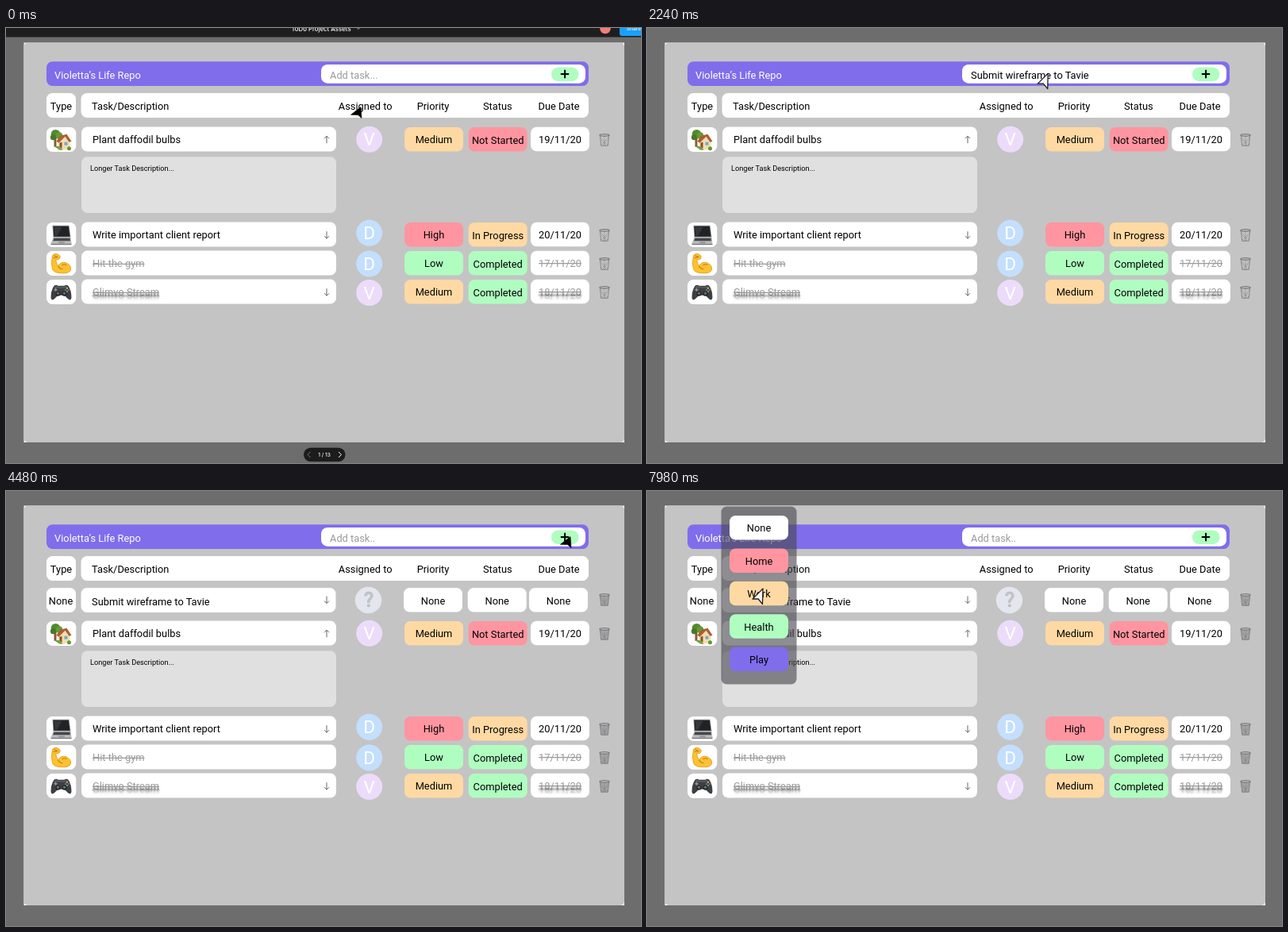
Write an HTML page that moves like this. It is 800x548 px and loops after 8 s.

```html
<!DOCTYPE html>
<html lang="en">
<head>
<meta charset="utf-8">
<title>Task board</title>
<style>
  html, body { margin: 0; width: 100%; height: 100%; overflow: hidden; background: #6d6d6d; }
  svg { display: block; width: 800px; height: 548px; }
  text { font: 12.85px Roboto, sans-serif; white-space: pre; }
  .mid { text-anchor: middle; }
  .done { fill: #9b9b9b; text-decoration: line-through; }
  .shade { text-shadow: 0 4px 2px rgba(0, 0, 0, .3); }
  .small { font-size: 9.2px; }
  .letter { font-size: 22.5px; fill: #fff; }
  .unknown { font: 500 25px Roboto, sans-serif; fill: #c3c5ca; stroke: #aeb1b8; stroke-width: .5; }
  .ui { font: 500 7.8px Inter, sans-serif; fill: #fff; }
  .tiny { font-size: 6.6px; }
  .line { fill: none; stroke: #555; stroke-width: .9; }
</style>
</head>
<body>
<svg id="stage" viewBox="0 0 800 548"></svg>
<script>
const LOOP = 8000, TYPED_AT = 1000, ADDED_AT = 3600, MENU_AT = 6550;
const C = {
  white: '#fff', purple: '#7f6dec', red: '#ff95a0', amber: '#ffd9a3', green: '#b0fdc0',
  lilac: '#ecdcfa', sky: '#c3dffd', pale: '#e3e6ec'
};

const box = (x, y, w, h, fill = C.white, r = 7.5) =>
  `<rect x="${x}" y="${y}" width="${w}" height="${h}" rx="${r}" fill="${fill}"/>`;
const text = (x, y, s, cls = '', extra = '') =>
  `<text x="${x}" y="${y + 4.6}" class="${cls}" ${extra}>${s}</text>`;
const label = (x, y, s, cls = '') => text(x, y, s, 'mid ' + cls);
const at = (x, y, body, id = '') => `<g ${id && `id="${id}"`} transform="translate(${x} ${y})">${body}</g>`;
const path = (d, fill, extra = '') => `<path d="${d}" fill="${fill}" ${extra}/>`;
const dot = (x, y, r, fill) => `<circle cx="${x}" cy="${y}" r="${r}" fill="${fill}"/>`;

const pill = (x, y, s, fill, cls = '', dy = 15.3) => box(x, y, 74, 30.5, fill) + label(x + 37, y + dy, s, cls);
const arrow = (y, up) => at(404, y, `<path class="line" d="M0-4.5V4.5M-3 ${up ? '-1.5L0-4.5L3-1.5' : '1.5L0 4.5L3 1.5'}"/>`);
const avatar = (y, s, fill) => dot(457.7, y, 16.5, fill) + text(457.7, y + 3.5, s, 'mid letter');

const bin = y => at(754, y,
  '<path class="bin" d="M-5.6-5.5L-4.3 7.3H4.3L5.6-5.5Z" stroke="#777" stroke-width=".8"/>' +
  '<path d="M-4.5-3L3.8 6M-4-.5L2 7M4.5-3L-3.8 6M4-.5L-2 7M0-5V7" stroke="#777" stroke-width=".7" stroke-dasharray="1.2 1" fill="none"/>' +
  '<ellipse cy="-6" rx="6.6" ry="1.3" fill="#bcbcbc" stroke="#686868" stroke-width=".9"/>');

const icons = {
  home: path('M-9-2H-6V9H-9Z', '#8a5a35') + dot(-7, -7, 5.8, '#548a2d') + dot(-10, -3, 3.6, '#467a28') +
    dot(-2.5, -5, 4.4, '#649a35') + path('M-4 1L4-5L11 1V11L2 13L-4 9Z', '#f3ddb0') +
    path('M-6 2L-1-5L7-7L13 2L10 3L5-4L-3 4Z', '#ad5d32') + path('M-2 4L1 3V11L-2 9Z', '#8b4c2c') +
    path('M4 3H8V7H4Z', '#6faccc') + path('M-8 9Q-3 6 2 13L-2 13Z', '#6ca33c') + dot(10, 11, 2.5, '#5f9636'),
  work: path('M-11-12H10L12 3H-10Z', '#8b8d90') + path('M-10-11H9.3L11 2H-9.2Z', '#202225') +
    path('M-9-10H1L-5 1H-8Z', '#34373b') + path('M-10 3H12L13 11H-13Z', '#b9bbbe') +
    path('M-9 4H11L11.4 7.5H-10.4Z', '#444649') + path('M-3 8.5H4L4.5 10.5H-3.5Z', '#94969a') +
    path('M-13 11H13V12.5H-13Z', '#777'),
  health: path('M-11-10Q-8-14-3-11Q0-9-2-6Q-5-4-7-5Q-6 0-4 3Q0-3 6-1Q13 2 12 8Q10 13 0 12Q-9 12-11 7Q-13 0-11-10Z', '#fcc22f',
    'stroke="#e89c1d" stroke-width=".9"') + path('M-10-7L-5-8M-9-10L-4-8M-4 3Q-2 7 2 7M1 2Q4 0 7 2', 'none', 'stroke="#c97b18" stroke-width="1.1"'),
  play: path('M-9-8Q-6-10-4-8H4Q6-10 9-8Q13-2 13 7Q12 12 8 8L4 4H-4L-8 8Q-12 12-13 7Q-13-2-9-8Z', '#3c3f43') +
    path('M-8-7Q-5-9-4-7H4Q6-9 8-7L9-5H-9Z', '#55595e') + dot(-4, 2, 3, '#222') + dot(4, 2, 3, '#222') +
    dot(-4, 1.6, 1.8, '#686b70') + dot(4, 1.6, 1.8, '#686b70') +
    path('M-9-3H-5M-7-5V-1', 'none', 'stroke="#94979b" stroke-width="1.4"') +
    dot(7.5, -4.8, 1.1, '#e3b93d') + dot(9.5, -2.7, 1.1, '#d9534a') + dot(5.5, -2.7, 1.1, '#4d86d9') + dot(7.5, -.8, 1.1, '#53b268')
};

function row(r) {
  const { y, icon, name, who, level, state, due, open, cls = '', dueY = 15.3 } = r;
  return box(51, y, 37.3, 31) + at(69.5, y + 15.7, icons[icon]) +
    box(95, y - .5, 321, 31) + text(109, y + 15.8, name, cls) +
    (open === undefined ? '' : arrow(y + 15.7, open)) +
    avatar(r.whoY, who, who === 'V' ? C.lilac : C.sky) +
    pill(502, y, ...level) + pill(582.7, y, ...state, '', 16.2) +
    pill(661, y - .3, due, C.white, cls, dueY) + bin(y + 16);
}

const rows = [
  { y: 125, icon: 'home', name: 'Plant daffodil bulbs', who: 'V', whoY: 140.3, level: ['Medium', C.amber],
    state: ['Not Started', C.red], due: '19/11/20', open: true, dueY: 16 },
  { y: 245, icon: 'work', name: 'Write important client report', who: 'D', whoY: 258.3, level: ['High', C.red],
    state: ['In Progress', C.amber], due: '20/11/20', open: false },
  { y: 281, icon: 'health', name: 'Hit the gym', who: 'D', whoY: 297, level: ['Low', C.green],
    state: ['Completed', C.green], due: '17/11/20', cls: 'done' },
  { y: 317, icon: 'play', name: 'Glimvo Stream', who: 'V', whoY: 333.5, level: ['Medium', C.amber],
    state: ['Completed', C.green], due: '18/11/20', open: false, cls: 'done shade' }
];

const header =
  box(51, 42.3, 683, 30.7, C.purple) + text(61, 59, 'Violetta’s Life Repo', '', 'fill="#fff"') +
  box(397, 46, 333, 23.7, C.white, 8) + text(408, 59, '', '', 'id="entry"') +
  box(687, 49.5, 34.5, 17.5, C.green, 8.7) + path('M698.8 58H709.2M704.1 52.8V63.2', 'none', 'stroke="#000" stroke-width="2"') +
  box(51, 82, 37, 31) + label(69.5, 98, 'Type') +
  box(94.5, 82, 639.5, 31) + text(108, 98, 'Task/Description') +
  [['Assigned to', 452.7], ['Priority', 538], ['Status', 619.3], ['Due Date', 696.5]].map(([s, x]) => label(x, 98, s)).join('');

const added = box(51, 122, 37, 31) + label(69, 138, 'None') +
  box(94.5, 122, 321, 31) + text(108, 139, 'Submit wireframe to Tavie') + arrow(137, false) +
  dot(456.5, 137.5, 16.7, C.pale) + text(457, 141.3, '?', 'mid unknown') +
  [501, 581.7, 659].map(x => pill(x, 122, 'None', C.white, '', 16)).join('') + bin(137);

const options = [['None', C.white], ['Home', C.red], ['Work', C.amber], ['Health', C.green], ['Play', C.purple]];
const menu = box(93.5, 19.5, 95, 224, 'rgba(72,72,80,.62)', 7) +
  options.map(([s, fill], i) => pill(104, 31 + i * 41.4, s, fill, '', 15.8)).join('');

const chrome = '<rect width="800" height="11.5" fill="#1e1e1e"/>' +
  '<text class="ui mid" x="397" y="4">ToDo Project Assets</text>' +
  path('M442-.5L444 1.5L446-.5', 'none', 'stroke="#bbb" stroke-width=".9"') +
  dot(755, .5, 6.8, '#f08078') + box(773, -12, 40, 22, '#18a0fb', 3) +
  '<text class="ui tiny mid" x="791" y="3">Share</text>' +
  box(375, 528.7, 52.5, 17.6, '#1c1c1c', 8.8) +
  path('M383.5 534L380 537.5L383.5 541', 'none', 'stroke="#777" stroke-width="1"') +
  path('M419 534L422.5 537.5L419 541', 'none', 'stroke="#fff" stroke-width="1"') +
  '<text class="ui tiny mid" x="401" y="540" id="page"></text>';

document.getElementById('stage').innerHTML =
  '<rect width="800" height="548" fill="#6d6d6d"/>' +
  box(22.5, 18.5, 756.5, 503.5, C.white, 0) + box(22.5, 18.5, 756.5, 503.5, '#c4c4c4', 5) +
  header + `<g id="added">${added}</g>` +
  at(0, 0, rows.map(row).join('') + box(95, 162.3, 321, 70.7, '#e0e0e0') +
    text(106, 175.2, 'Longer Task Description...', 'small'), 'list') +
  `<g id="menu">${menu}</g><g id="chrome">${chrome}</g>` +
  '<circle id="ring" cx="440.5" cy="57" fill="none" stroke="#8a8a8a" stroke-width="1"/>' +
  '<path id="cursor" stroke-linejoin="round"/>';

const $ = Object.fromEntries([...document.querySelectorAll('[id]')].map(e => [e.id, e]));
const bins = document.querySelectorAll('.bin');
const show = (el, on) => el.setAttribute('visibility', on ? 'visible' : 'hidden');
const clamp = p => Math.min(1, Math.max(0, p));
const ease = p => p < .5 ? 4 * p ** 3 : 1 - 4 * (1 - p) ** 3;

// Each move: start, end, click time, then the tip position it reaches.
const moves = [
  [250, 750, TYPED_AT, 448, 57],
  [1900, 2800, ADDED_AT, 711, 57.5],
  [4900, 6350, MENU_AT, 77, 137],
  [7450, 7960, LOOP, 146, 123]
];

function cursorAt(t) {
  let x = 447, y = 99.5, pointing = false;
  for (const [start, end, click, tx, ty] of moves) {
    const p = ease(clamp((t - start) / (end - start)));
    x += (tx - x) * p;
    y += (ty - y) * p;
    if (t >= start && t < click) pointing = true;
  }
  return { x, y, pointing };
}

function render(t) {
  const typed = t >= TYPED_AT && t < ADDED_AT, isAdded = t >= ADDED_AT;
  $.entry.textContent = typed ? 'Submit wireframe to Tavie' : isAdded ? 'Add task..' : 'Add task...';
  $.entry.setAttribute('fill', typed ? '#000' : '#9a9a9a');
  $.page.textContent = t < TYPED_AT ? '1 / 13' : '2 / 13';
  $.list.setAttribute('transform', `translate(0 ${isAdded ? 39 : 0})`);
  for (const b of bins) b.setAttribute('fill', isAdded ? '#a3a5a8' : 'none');
  show($.added, isAdded);
  show($.menu, t >= MENU_AT);
  $.chrome.setAttribute('opacity', 1 - clamp((t - 950) / 420));

  const wave = clamp((t - TYPED_AT) / 400);
  show($.ring, wave > 0 && wave < 1);
  $.ring.setAttribute('r', 6 + 14 * wave);
  $.ring.setAttribute('opacity', 1 - wave * .8);

  const { x, y, pointing } = cursorAt(t);
  $.cursor.setAttribute('transform', `translate(${x} ${y})`);
  $.cursor.setAttribute('d', pointing ? 'M0 0L-13 13L-5.8 13L-.5 19.5Z' : 'M0 0L-12.5 9.8L-3.5 10L1 14Z');
  $.cursor.setAttribute('fill', pointing ? '#f4f4f4' : '#000');
  $.cursor.setAttribute('stroke', pointing ? '#222' : '#000');
  $.cursor.setAttribute('stroke-width', pointing ? 1.3 : .6);
}

const begin = performance.now();
function tick() {
  render((performance.now() - begin) % LOOP);
  requestAnimationFrame(tick);
}
tick();
</script>
</body>
</html>
```
